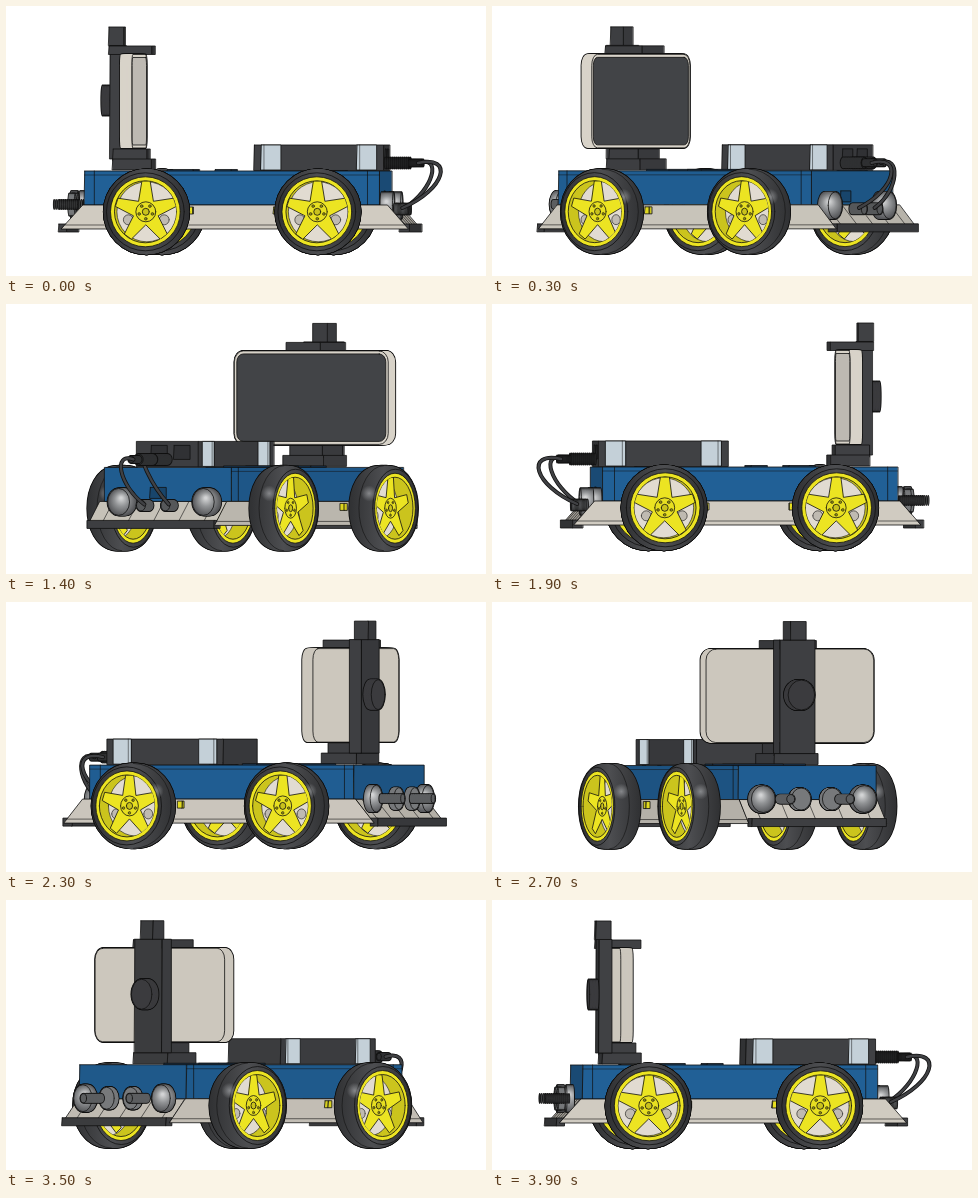
Write an HTML page with a canvas that moves like this. It is 480 px wide and 270 px high and loops after 4 s.

```html
<!DOCTYPE html>
<html>
<head>
<meta charset="utf-8">
<style>
html, body { margin: 0; width: 100%; height: 100%; overflow: hidden; background: #fff; }
canvas { display: block; }
</style>
</head>
<body>
<canvas id="stage" width="480" height="270"></canvas>
<script>
const ctx = document.getElementById('stage').getContext('2d');
const AXIS_X = 242;
const BLACK = [65, 66, 69], BLUE = [34, 98, 153], CREAM = [212, 207, 197];
const SILVER = [196, 208, 216], YELLOW = [236, 228, 34];

// Turntable angle in degrees at each step of 100 ms.
const TURN = [[0, 4.5], [7, 67], [14, 125.5], [19, 175.5], [23, 207], [31, 278], [39, 355.5], [40, 364.5]];

let cos, sin, lift;

function angleAt(step) {
  const i = TURN.findIndex(k => k[0] > step);
  const [s0, a0] = TURN[i - 1], [s1, a1] = TURN[i];
  return a0 + (a1 - a0) * (step - s0) / (s1 - s0);
}

// Orthographic view from the side: x along the car, z across it, y already in screen units.
const px = (x, z) => AXIS_X + x * cos - z * sin;
const point = (x, y, z) => [px(x, z), y + lift];
const shade = (c, k) => `rgb(${c.map(v => Math.min(255, Math.round(v * k))).join()})`;

function ink(fill, line = 0.8) {
  if (fill) { ctx.fillStyle = fill; ctx.fill(); }
  if (line) { ctx.lineWidth = line; ctx.strokeStyle = '#111'; ctx.stroke(); }
}

function poly(points, fill, line) {
  ctx.beginPath();
  points.forEach(p => ctx.lineTo(...point(...p)));
  ctx.closePath();
  ink(fill, line);
}

function line(a, b, width = 0.7) {
  ctx.beginPath();
  ctx.moveTo(...point(...a));
  ctx.lineTo(...point(...b));
  ink(null, width);
}

// Visible end of a block; `flare` slopes it outwards towards the bottom.
function endFace(x0, x1, y0, y1, z0, z1, color, flare = 0) {
  const x = sin > 0 ? x1 : x0, out = sin > 0 ? flare : -flare;
  poly([[x, y0, z0], [x, y0, z1], [x + out, y1, z1], [x + out, y1, z0]],
    shade(color, 0.74 + 0.24 * Math.abs(sin)));
}

function sideFace(x0, x1, y0, y1, z0, z1, color, flare = 0) {
  const z = cos > 0 ? z1 : z0;
  poly([[x0, y0, z], [x1, y0, z], [x1 + flare, y1, z], [x0 - flare, y1, z]],
    shade(color, 0.74 + 0.24 * Math.abs(cos)));
}

function box(...block) {
  endFace(...block);
  sideFace(...block);
}

// Traces a flat shape lying across the z axis ('z') or the x axis ('x').
function trace(axis, x, y, z, draw) {
  ctx.beginPath();
  ctx.setTransform(axis === 'z' ? cos : -sin, 0, 0, 1, px(x, z), y + lift);
  draw();
  ctx.setTransform(1, 0, 0, 1, 0, 0);
}

const disc = (axis, x, y, z, r) => trace(axis, x, y, z, () => ctx.arc(0, 0, r, 0, 7));

// Solid made of parallel slices, outlined as one.
function sweep(from, to, facing, slice, fill, n = 12) {
  const order = [...Array(n + 1).keys()];
  if (facing < 0) order.reverse();
  const at = i => from + (to - from) * i / n;
  order.forEach(i => { slice(at(i)); ink(null, 1.8); });
  order.forEach(i => { slice(at(i)); ink(fill, 0); });
  slice(at(order[n]));
  ink(fill);
}

function rod(x0, x1, y, z, r, fill) {
  sweep(x0, x1, sin, x => disc('x', x, y, z, r), fill);
}

function dome(x0, x1, y, z, r) {
  const [cx, cy] = point((x0 + x1) / 2, y, z);
  const g = ctx.createRadialGradient(cx - 1, cy - 4, 1, cx, cy, r + 2);
  g.addColorStop(0, '#d2d3d4');
  g.addColorStop(0.4, '#929496');
  g.addColorStop(1, '#48494c');
  rod(x0, x1, y, z, r, g);
}

function star() {
  for (let i = 0; i < 5; i++) {
    const a = (i * 72 - 90) * Math.PI / 180;
    for (const [r, d] of [[31, -0.14], [31, 0.14], [13, Math.PI / 5]]) {
      ctx.lineTo(r * Math.cos(a + d), r * Math.sin(a + d));
    }
  }
  ctx.closePath();
}

function wheel(x, side) {
  const y = 204.8, z = side * 99.5, toward = Math.sign(cos), face = z + toward * 14;
  const left = px(x, z) - 43 * Math.abs(cos) - 14.5 * Math.abs(sin);
  const g = ctx.createLinearGradient(left, 0, 2 * px(x, z) - left, 0);
  g.addColorStop(0, '#2e2f31');
  g.addColorStop(0.5, '#4d4e51');
  g.addColorStop(1, '#2e2f31');
  sweep(z - 14.5, z + 14.5, cos, v => disc('z', x, y, v, 42.5 - 3.5 * ((v - z) / 14.5) ** 4), g, 16);

  if (Math.abs(sin) > 0.3) {
    const dir = -Math.sign(sin) * toward;
    ctx.beginPath();
    ctx.ellipse(px(x, z), y + lift, 42.5 * Math.abs(cos), 42.5, 0,
      dir > 0 ? Math.PI / 2 : -Math.PI / 2, dir > 0 ? Math.PI * 1.5 : Math.PI / 2);
    ink(null, 0.6);
    const glint = px(x, z) + Math.sign(sin) * toward * 25 * Math.abs(cos);
    const spot = ctx.createRadialGradient(glint, 190 + lift, 0, glint, 190 + lift, 8);
    spot.addColorStop(0, 'rgba(170,172,175,.65)');
    spot.addColorStop(1, 'rgba(170,172,175,0)');
    ctx.fillStyle = spot;
    ctx.fillRect(glint - 8, 182 + lift, 16, 16);
  }

  disc('z', x, y, face, 35);
  ink(shade(YELLOW, 1));
  ctx.save();
  disc('z', x, y, face, 31);
  ink(shade(YELLOW, 0.86));
  ctx.clip();
  disc('z', x, y, face - toward * 18, 30);
  ink(shade(CREAM, 1.06), 0.6);
  const hub = side * 108;
  for (const s of [-1, 1]) {
    trace('z', x, y, hub - side * 6, () => ctx.arc(s * 18, 8, 5, 0, 7));
    ink(shade(CREAM, 0.9), 0.6);
  }
  trace('z', x, y, hub, star);
  ink(shade(YELLOW, 1));
  disc('z', x, y, hub, 10);
  ink(shade(YELLOW, 0.98));
  for (let i = 0; i < 5; i++) {
    const a = (i * 72 - 54) * Math.PI / 180;
    trace('z', x, y, hub, () => ctx.arc(7 * Math.cos(a), 7 * Math.sin(a), 1.4, 0, 7));
    ink(shade(YELLOW, 0.6), 0.5);
  }
  disc('z', x, y, hub, 3.5);
  ink(shade(YELLOW, 0.85));
  ctx.restore();
}

function wheels(side) {
  const xs = sin > 0 ? [-94, 78] : [78, -94];
  xs.forEach(x => wheel(x, side));
}

function phone() {
  const slab = (x, inset) => trace('x', x, 0, 0, () =>
    ctx.roundRect(-94.5 + inset, 47.5 + inset, 189 - 2 * inset, 93.5 - 2 * inset, 11 - inset));
  sweep(-121, -109, sin, x => slab(x, 0), shade(CREAM, sin > 0 ? 1.02 : 0.96));
  if (sin > 0) {
    slab(-109, 3);
    ink(sin < 0.16 ? '#bdb9b2' : '#424447');
  }
}

function tower() {
  const arm = () => box(-138, -95, 39, 47.5, -21, 21, BLACK);
  const parts = [
    () => rod(-146, -137, 93.5, 0, 15, shade(BLACK, 0.9)),
    () => {
      box(-137, -124, 38.5, 152, -20, 20, BLACK);
      box(-139, -124, 20, 38.5, -9, 9, BLACK);
    },
    () => {
      if (sin > 0) arm();
      box(-134, -100, 142, 154, -20, 20, BLACK);
      box(-134, -95, 152, 163, -25, 25, BLACK);
    },
    phone
  ];
  if (sin < 0) {
    arm();
    parts.reverse();
  }
  parts.forEach(draw => draw());
}

function battery() {
  box(9, 139, 138, 163.5, -38, 38, BLACK);
  const z = cos > 0 ? 38 : -38;
  for (const x of [16, 112]) {
    poly([[x, 138, z], [x + 20, 138, z], [x + 20, 163, z], [x, 163, z]], shade(SILVER, 1));
    line([x + 3, 138, z], [x + 3, 163, z], 0.5);
  }
  if (sin > 0) {
    for (const s of [20, -8]) {
      poly([[139, 142, s], [139, 142, s - 20], [139, 156, s - 20], [139, 156, s]], '#303134');
    }
  }
}

const SKIRT = [-160, 146, 198, 222, -78, 78, CREAM, 21];

function chassis() {
  endFace(...SKIRT);
  const [top, bottom] = sin > 0 ? [146, 163] : [-160, -177];
  for (let s = -62; s <= 62; s += 31) line([top, 199, s], [bottom, 218, s], 0.6);
  for (const [x0, x1] of [[-78, -52], [-30, -14]]) box(x0, x1, 162.5, 164.5, -40, 40, [28, 62, 95]);
  box(-158, 138, 164, 198, -78, 78, BLUE);
  const z = cos > 0 ? 78 : -78;
  line([-148, 164, z], [-148, 198, z]);
  line([126, 164, z], [126, 198, z]);
  line([-158, 168, z], [138, 168, z], 0.5);
  if (sin > 0) poly([[138, 184, 22], [138, 184, 2], [138, 195, 2], [138, 195, 22]], shade(BLUE, 0.7));
}

// The near skirt panel hides the parts mounted between the two panels.
function skirtPanel() {
  sideFace(...SKIRT);
  const z = cos > 0 ? 78 : -78, out = cos > 0 ? 83 : -83;
  line([-177, 218, z], [163, 218, z], 0.6);
  for (const x of [-54, 32]) box(x, x + 5, 200, 207, Math.min(z, out), Math.max(z, out), YELLOW);
}

function cable(z0, z1, reach) {
  ctx.beginPath();
  ctx.moveTo(...point(172, 156, z0));
  ctx.bezierCurveTo(...point(reach, 148, z0), ...point(reach - 8, 182, z1), ...point(156, 201, z1));
  ctx.lineCap = 'round';
  ink(null, 4);
  ctx.lineWidth = 2.4;
  ctx.strokeStyle = '#404144';
  ctx.stroke();
}

function cableEnd() {
  box(158, 168, 217, 225, -78, 78, BLACK);
  for (const z of [-52, 52]) dome(138, 150, 198.5, z, 13.5);
  for (const [z0, z1, reach] of [[0, -14, 194], [18, 16, 208]]) {
    rod(148, 162, 202, z1, 5.5, '#56585a');
    rod(139, 163, 156, z0, 5.5, '#2f3032');
    rod(163, 176, 156, z0, 3.5, '#2f3032');
    cable(z0, z1, reach);
  }
}

function sensorEnd() {
  box(-184, -176, 217, 225, -76, 76, BLACK);
  for (const z of [-57, 57]) dome(-173, -166, 197.5, z, 13.5);
  for (const z of [-17, 18]) rod(-178, -172, 197.5, z, 11, '#77797b');
  for (const z of [-36, 31]) rod(-192, -168, 197.5, z, 4.5, '#5c5e60');
}

function render(step) {
  const a = angleAt(step) * Math.PI / 180;
  cos = Math.cos(a);
  sin = Math.sin(a);
  lift = cos;
  ctx.fillStyle = '#fff';
  ctx.fillRect(0, 0, 480, 270);
  ctx.lineJoin = 'round';
  const near = Math.sign(cos);
  const ends = sin > 0 ? [sensorEnd, cableEnd] : [cableEnd, sensorEnd];
  const tops = sin > 0 ? [tower, battery] : [battery, tower];
  wheels(-near);
  [ends[0], ...tops, chassis, ends[1], skirtPanel].forEach(draw => draw());
  wheels(near);
}

function tick() {
  render(Math.floor(performance.now() / 100) % 40);
  requestAnimationFrame(tick);
}
tick();
</script>
</body>
</html>
```
